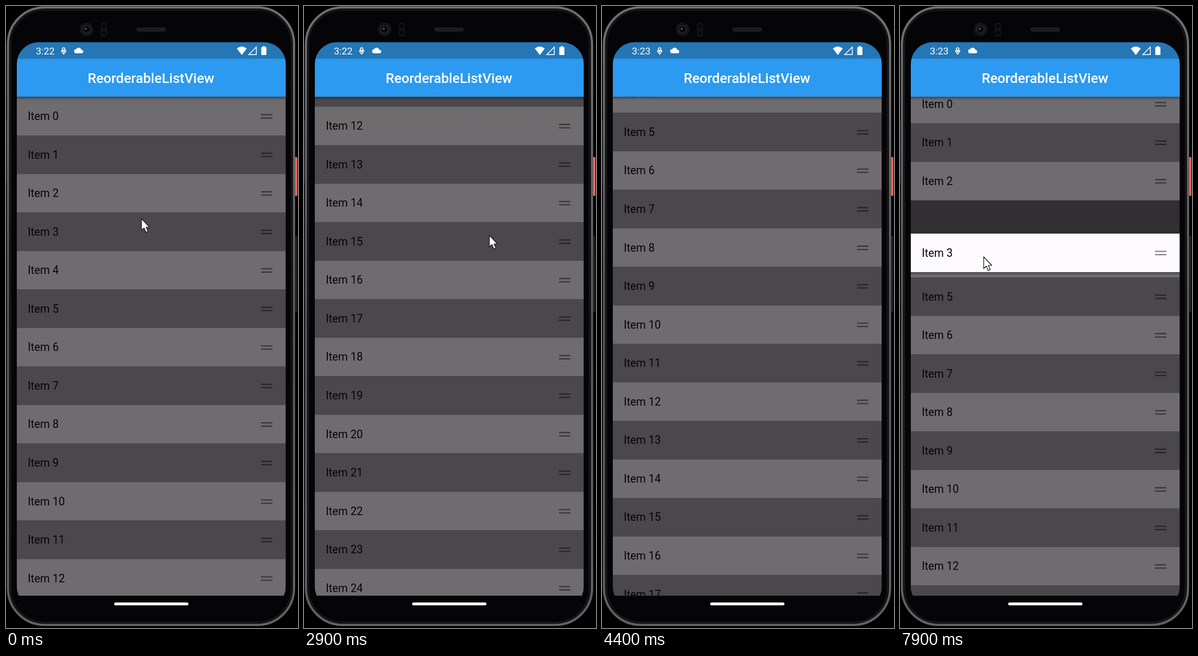
An HTML page for the animation above (8000 ms loop, 513x1091 px).

```html
<!DOCTYPE html>
<html lang="en">
<head>
<meta charset="utf-8">
<title>Reorderable list</title>
<style>
html, body { margin: 0; width: 100%; height: 100%; overflow: hidden; background: #000; }
svg { display: block; width: 100vw; height: 100vh; }
text { font-family: Roboto, "Noto Sans", sans-serif; }
.label { font-size: 19.3px; fill: #060506; }
</style>
</head>
<body>
<svg viewBox="0 0 513 1091" xmlns="http://www.w3.org/2000/svg">
  <defs>
    <clipPath id="screen"><rect x="19" y="63.5" width="472.5" height="993" rx="38"/></clipPath>
    <clipPath id="view"><rect x="19" y="159.3" width="472.5" height="875"/></clipPath>
    <linearGradient id="barShade" x2="0" y2="1">
      <stop offset="0" stop-opacity=".4"/>
      <stop offset="1" stop-opacity="0"/>
    </linearGradient>
    <linearGradient id="metal" x2="0" y2="1">
      <stop offset="0" stop-color="#706f71"/>
      <stop offset=".5" stop-color="#545355"/>
      <stop offset="1" stop-color="#626163"/>
    </linearGradient>
  </defs>

  <!-- phone body -->
  <rect width="513" height="1091"/>
  <rect x="507" y="265" width="5" height="68" rx="1.5" fill="#e8644f"/>
  <rect x="507" y="403" width="5" height="134" rx="1.5" fill="#1d1c1e"/>
  <rect y="200" width="3" height="110" fill="#151416"/>
  <rect x="3.5" y="2.5" width="502.5" height="1083" rx="64" fill="#050406" stroke="url(#metal)" stroke-width="4"/>
  <rect x="8" y="7" width="493.5" height="1074" rx="59" fill="none" stroke="#1c1b1d" stroke-width="2"/>
  <circle cx="141.5" cy="41" r="12" fill="#151416"/>
  <circle cx="141.5" cy="41" r="6.5" fill="#08080a" stroke="#29282b" stroke-width="1.5"/>
  <circle cx="140" cy="40" r="1.8" fill="#59585c"/>
  <rect x="166.5" y="29" width="11" height="25" rx="4" fill="#111012"/>
  <circle cx="172" cy="35" r="3" fill="#050506"/>
  <circle cx="172" cy="47" r="3" fill="#050506"/>
  <rect x="229" y="37.5" width="52" height="7.5" rx="3.7" fill="#1e1c1e"/>

  <g clip-path="url(#screen)">
    <g clip-path="url(#view)">
      <rect x="19" y="159" width="473" height="876" fill="#312f32"/>
      <g id="rows"></g>
      <rect x="19" y="159" width="473" height="6" fill="url(#barShade)"/>
      <g id="lifted">
        <rect x="19" y="30" width="473" height="42" opacity=".16"/>
        <rect x="19" y="30" width="473" height="39.5" opacity=".28"/>
        <rect x="19" y="-1.5" width="473" height="3" opacity=".2"/>
      </g>
    </g>
    <rect x="19" y="92" width="473" height="67.3" fill="#2b9af0"/>
    <rect x="19" y="63" width="473" height="29.5" fill="#2476b5"/>
    <text x="254.7" y="134.7" text-anchor="middle" font-size="24.1" font-weight="500" fill="#fff">ReorderableListView</text>
    <text id="clock" x="52.5" y="85" font-size="17" fill="#fff"></text>
    <g fill="none" stroke="#fff" stroke-width="1.4">
      <circle cx="101.3" cy="75.5" r="2.3"/>
      <path d="M97 78.5L101.3 84.5L105.6 78.5M97 78.5Q100 77.5 101.3 80.5Q102.6 77.5 105.6 78.5"/>
      <path d="M426.5 85.2H439.7V72Z"/>
    </g>
    <g fill="#fff">
      <path d="M123.5 83a3.6 3.6 0 0 1-.3-7.2a5 5 0 0 1 9.3 1.2a3 3 0 0 1 .3 6Z"/>
      <path d="M405.5 74.5Q414.3 67.5 423 74.5L414.3 86Z"/>
      <path d="M451 70.5h4v1.5h1.5q1 0 1 1v12q0 1-1 1h-7q-1 0-1-1v-12q0-1 1-1h1.5Z"/>
    </g>
  </g>
  <rect x="190" y="1046.3" width="130.5" height="5" rx="2.5" fill="#fff"/>
  <path id="cursor" d="M0 0V20.5L4.6 16.3L8 24L11.6 22.4L8.2 15H14.2Z" fill="#fff" stroke="#161517" stroke-width="1.2" stroke-linejoin="round"/>
</svg>
<script>
const LOOP = 8000, STEP = 100;
const TOP = 159.5, ROW = 67.56, COUNT = 50;
const PICKED = 3, PICK_TIME = 6100, GRIP = 7;
const $ = id => document.getElementById(id);

const flings = [
  { at: 1800, time: 700, by: 463 },
  { at: 2700, time: 900, by: 837 },
  { at: 3800, time: 2400, by: -2263 },
  { at: 6600, time: 200, by: 21.3 }
];
// Places where the pointer turns or rests: [time, x, y]
const stops = [
  [900, 238, 373], [1500, 279, 550], [1800, 288, 648], [2200, 300, 285], [2600, 290, 723],
  [3100, 345, 228], [3600, 345, 228], [4000, 380, 660], [4300, 530, 500], [4600, 530, 500],
  [5500, 140, 393], [6000, 140, 393], [6600, 150, 985], [7400, 147, 310], [7900, 147, 440]
];

const clamp = x => Math.min(1, Math.max(0, x));
const smooth = x => (x = clamp(x), x * x * (3 - 2 * x));
const easeOut = x => 1 - (1 - clamp(x)) ** 2;
const mix = (a, b, u) => a + (b - a) * u;
const move = (el, x, y) => el.setAttribute("transform", `translate(${x} ${y})`);

// Each fling slows down and the list stops hard at its top.
const scrollAt = t => flings.reduce(
  (pos, f) => Math.max(0, pos + f.by * easeOut((t - f.at) / f.time)), 0);

function pointerAt(t) {
  const next = Math.max(1, stops.findIndex(s => s[0] >= t));
  const [t0, x0, y0] = stops[next - 1], [t1, x1, y1] = stops[next];
  const u = smooth((t - t0) / (t1 - t0));
  return [mix(x0, x1, u), mix(y0, y1, u)];
}

function rowMarkup(i, fill) {
  return `<rect x="19" width="473" height="${ROW}" fill="${fill}"/>
    <text class="label" x="38.3" y="40.5">Item ${i}</text>
    <path d="M448 31.2h20M448 37h20" stroke="#000" stroke-opacity=".47" stroke-width="2.3"/>`;
}

const rows = Array.from({ length: COUNT }, (_, i) => {
  const g = document.createElementNS("http://www.w3.org/2000/svg", "g");
  g.innerHTML = rowMarkup(i, i % 2 ? "#4a484b" : "#6f6c70");
  return $("rows").appendChild(g);
});
$("lifted").insertAdjacentHTML("beforeend", rowMarkup(PICKED, "#fdfbff"));

// Rows passed by the lifted item slide into the space it left.
function makeWay(i, drag) {
  const gap = i - PICKED, dir = Math.sign(gap);
  return -dir * ROW * smooth((dir * drag - (Math.abs(gap) - 1) * ROW - 60) / 45);
}

function draw(t) {
  const scroll = scrollAt(t);
  const [cx, cy] = pointerAt(t);
  const lifted = t >= PICK_TIME;
  const liftedTop = cy - GRIP - ROW / 2;
  const drag = liftedTop - (TOP + PICKED * ROW - scroll);

  rows.forEach((row, i) => {
    const y = TOP + i * ROW - scroll + (lifted ? makeWay(i, drag) : 0);
    const hidden = y < TOP - ROW || y > 1035 || (lifted && i === PICKED);
    row.style.display = hidden ? "none" : "";
    move(row, 0, y);
  });
  $("lifted").style.display = lifted ? "" : "none";
  move($("lifted"), 0, liftedTop);
  move($("cursor"), cx, cy);
  $("clock").textContent = t < 4000 ? "3:22" : "3:23";
}

const start = performance.now();
function tick() {
  const t = (performance.now() - start) % LOOP;
  draw(Math.floor(t / STEP) * STEP);
  requestAnimationFrame(tick);
}
tick();
</script>
</body>
</html>
```
